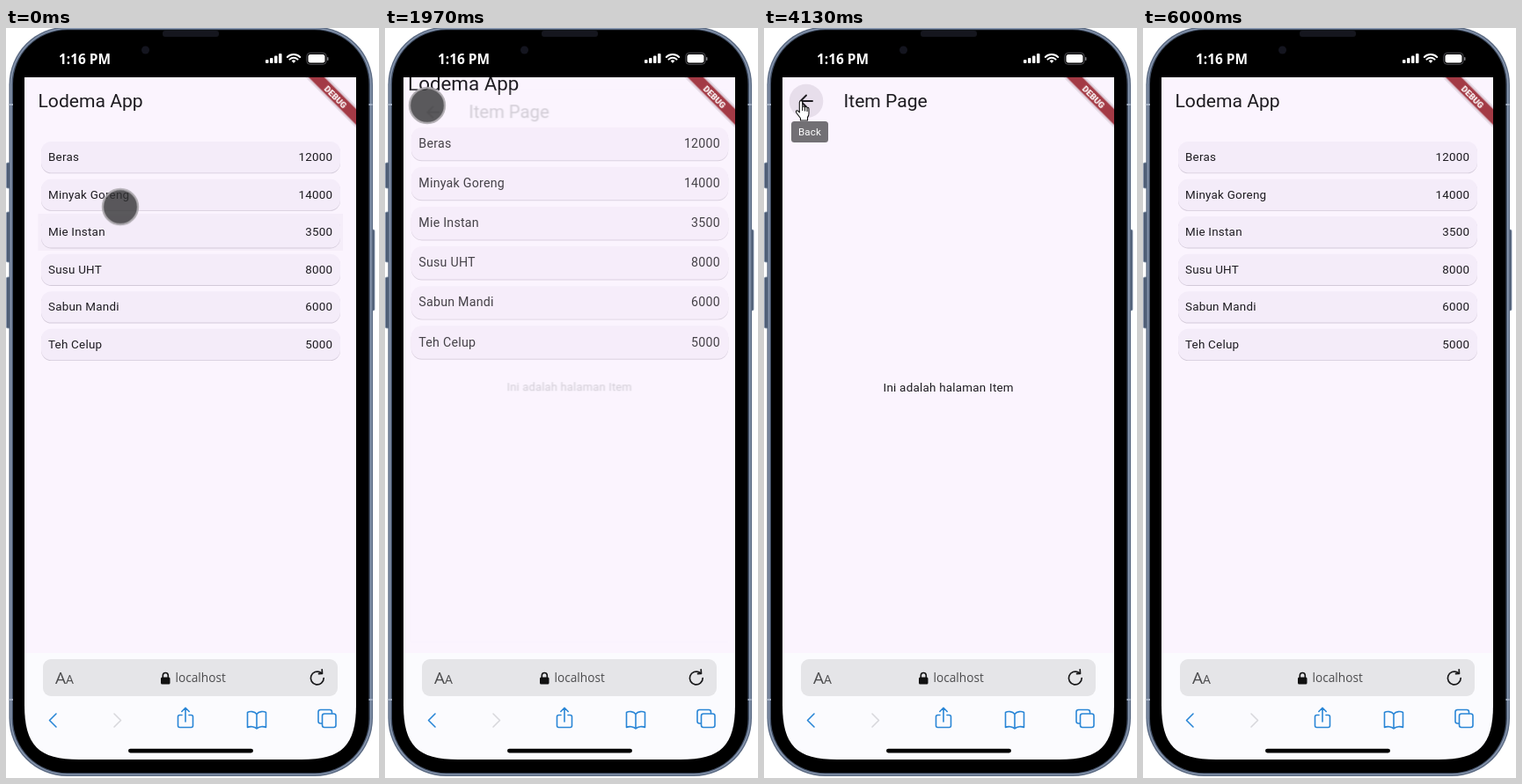
Animation of 424x852 px, one loop 6030 ms. Source, as an HTML page:

```html
<!DOCTYPE html>
<html lang="id">
<head>
<meta charset="utf-8">
<title>Lodema App</title>
<style>
html, body { margin: 0; width: 100%; height: 100%; overflow: hidden; background: #fff; }
svg { display: block; width: 424px; height: 852px; }
text { font-family: Roboto, "Open Sans", sans-serif; fill: #1d1b20; }
.title { font-size: 21.1px; }
.body { font-size: 13.4px; letter-spacing: .24px; }
.end { text-anchor: end; }
.mid { text-anchor: middle; }
.line { fill: none; stroke-linecap: round; stroke-linejoin: round; }
.page { fill: #fbf4fe; }

#home, #item, #touch, #hand, #tip, #halo, .glow {
  animation: 6030ms linear infinite;
}
#home, #item { transform-origin: 209.5px 400px; }
#home { animation-name: home; }
#item { animation-name: itemZoom, itemFade; }
#touch { animation-name: path, seen; }
#hand { animation-name: hand; }
#tip, #halo { animation-name: tip; }
.glow { opacity: 0; }
#glow0 { animation-name: glow0; }
#glow1 { animation-name: glow1; }
#glow2 { animation-name: glow2; }

/* Each zoom runs 300 ms: a quick first sixth, then a long settle. */
@keyframes home {
  0% { transform: scale(1); }
  7.463% { transform: scale(1); animation-timing-function: cubic-bezier(.3,0,.8,.15); }
  8.292% { transform: scale(1.02); animation-timing-function: cubic-bezier(.05,.7,.1,1); }
  12.438% { transform: scale(1.05); }
  31.858% { transform: scale(1.1); animation-timing-function: cubic-bezier(.3,0,.8,.15); }
  32.687% { transform: scale(1.06); animation-timing-function: cubic-bezier(.05,.7,.1,1); }
  36.833% { transform: scale(1); }
  53.566% { transform: scale(1); animation-timing-function: cubic-bezier(.3,0,.8,.15); }
  54.395% { transform: scale(1.02); animation-timing-function: cubic-bezier(.05,.7,.1,1); }
  58.541% { transform: scale(1.05); }
  70.149% { transform: scale(1.1); animation-timing-function: cubic-bezier(.3,0,.8,.15); }
  70.978% { transform: scale(1.06); animation-timing-function: cubic-bezier(.05,.7,.1,1); }
  75.124%, 100% { transform: scale(1); }
}
@keyframes itemZoom {
  0% { transform: scale(.85); }
  7.463% { transform: scale(.85); animation-timing-function: cubic-bezier(.3,0,.8,.15); }
  8.292% { transform: scale(.91); animation-timing-function: cubic-bezier(.05,.7,.1,1); }
  12.438% { transform: scale(1); }
  31.858% { transform: scale(1); animation-timing-function: cubic-bezier(.3,0,.8,.15); }
  32.687% { transform: scale(.96); animation-timing-function: cubic-bezier(.05,.7,.1,1); }
  36.833% { transform: scale(.9); }
  53.566% { transform: scale(.85); animation-timing-function: cubic-bezier(.3,0,.8,.15); }
  54.395% { transform: scale(.91); animation-timing-function: cubic-bezier(.05,.7,.1,1); }
  58.541% { transform: scale(1); }
  70.149% { transform: scale(1); animation-timing-function: cubic-bezier(.3,0,.8,.15); }
  70.978% { transform: scale(.96); animation-timing-function: cubic-bezier(.05,.7,.1,1); }
  75.124%, 100% { transform: scale(.9); }
}
@keyframes itemFade {
  0%, 8.085% { opacity: 0; }
  8.706%, 32.18% { opacity: 1; }
  32.8%, 54.187% { opacity: 0; }
  54.809%, 70.5% { opacity: 1; }
  71.12%, 100% { opacity: 0; }
}
@keyframes path {
  0% { transform: translate(130px,203.5px); animation-timing-function: ease-out; }
  3.98% { transform: translate(130px,154px); }
  14.43% { transform: translate(130px,154px); animation-timing-function: ease-in-out; }
  21.06% { transform: translate(58px,171px); }
  22.72% { transform: translate(58px,171px); animation-timing-function: ease-in-out; }
  26.2% { transform: translate(42px,92px); animation-timing-function: ease-out; }
  28.19% { transform: translate(48px,88px); }
  34.49% { transform: translate(48px,88px); animation-timing-function: ease-in-out; }
  40.96% { transform: translate(93px,190.5px); }
  54.73% { transform: translate(93px,190.5px); animation-timing-function: ease-in-out; }
  59.04% { transform: translate(43px,83px); }
  74.3% { transform: translate(44px,88px); animation-timing-function: cubic-bezier(.4,0,.8,.8); }
  82.92% { transform: translate(237px,353.3px); }
  86.24%, 100% { transform: translate(370px,527px); }
}
@keyframes seen {
  0% { opacity: 1; animation-timing-function: step-end; }
  59.2% { opacity: 0; animation-timing-function: step-end; }
  69.65% { opacity: 1; animation-timing-function: step-end; }
  86.73%, 100% { opacity: 0; }
}
@keyframes hand {
  0% { opacity: 0; animation-timing-function: step-end; }
  59.2% { opacity: 1; animation-timing-function: step-end; }
  69.65%, 100% { opacity: 0; }
}
@keyframes tip {
  0%, 62.8% { opacity: 0; }
  63.52%, 69.65% { opacity: 1; }
  71.1%, 100% { opacity: 0; }
}
@keyframes glow0 {
  0%, 3.5% { opacity: 0; }
  5%, 8% { opacity: 1; }
  9.5%, 100% { opacity: 0; }
}
@keyframes glow1 {
  0%, 39.8% { opacity: 0; }
  41.4%, 54.5% { opacity: 1; }
  56%, 100% { opacity: 0; }
}
@keyframes glow2 {
  0% { opacity: .4; }
  1.7%, 100% { opacity: 0; }
}
</style>
</head>
<body>
<svg viewBox="0 0 424 852">
  <defs>
    <clipPath id="view"><rect x="21" y="56" width="377" height="654"/></clipPath>
  </defs>

  <!-- phone body -->
  <g fill="#4d5c74" stroke="#8f9db3" stroke-width=".8">
    <rect x=".4" y="153" width="5" height="29" rx="1.5"/>
    <rect x=".4" y="209" width="5" height="57" rx="1.5"/>
    <rect x=".4" y="283" width="5" height="58" rx="1.5"/>
    <rect x="414" y="229" width="5" height="92" rx="1.5"/>
  </g>
  <rect x="3.500" y="-1.500" width="413.500" height="851.500" rx="66" fill="#5d6c84"/>
  <rect x="5" y="0" width="410.500" height="848.500" rx="64.500" fill="#8a99b1"/>
  <rect x="6.500" y="1.200" width="407.500" height="846" rx="63" fill="#46546b"/>
  <rect x="8" y="2.200" width="404.500" height="844" rx="61.500" fill="#000"/>
  <path d="M4 87h4M412.500 87h4M4 763h4M412.500 763h4" stroke="#a3b0c4" stroke-width="2"/>
  <rect x="178" y="3" width="64" height="7" rx="3" fill="#15161e"/>
  <circle cx="158.500" cy="25" r="4.500" fill="#14151f"/>

  <!-- status bar -->
  <text x="60" y="40.500" style="font:700 15.4px 'Open Sans',sans-serif;fill:#fff">1:16 PM</text>
  <g fill="#fff">
    <rect x="295" y="36" width="3.500" height="4" rx="1"/>
    <rect x="300" y="34" width="3.500" height="6" rx="1"/>
    <rect x="305" y="31.500" width="3.500" height="8.500" rx="1"/>
    <rect x="310" y="29" width="3.500" height="11" rx="1"/>
    <rect x="343.500" y="30" width="19" height="9.500" rx="2.500"/>
    <rect x="341.800" y="28.300" width="22.400" height="13" rx="4" fill="none" stroke="#66666c" stroke-width=".8"/>
    <rect x="365" y="33" width="1.500" height="4" rx=".7" fill="#808086"/>
    <path d="M324.700 37.300a3.600 3.600 0 0 1 4.600 0l-2.300 2.700z"/>
  </g>
  <path class="line" d="M319.800 33a10.300 10.300 0 0 1 14.400 0M322.400 35.600a6.600 6.600 0 0 1 9.200 0" stroke="#fff" stroke-width="2"/>

  <path d="M21 56H398V769C398 815 382 831 336 831H83C37 831 21 815 21 769z" fill="#fbfbfe"/>

  <!-- app -->
  <g clip-path="url(#view)">
    <rect class="page" x="21" y="56" width="377" height="654"/>
    <g id="home">
      <text class="title" x="36.500" y="89.500">Lodema App</text>
      <g id="list"></g>
    </g>
    <g id="item">
      <rect class="page" x="21" y="56" width="377" height="654"/>
      <circle id="halo" cx="48" cy="83" r="19.300" fill="#e7deeb"/>
      <path class="line" d="M55 83H42M48 76.500L41.500 83L48 89.500" stroke="#1d1b20" stroke-width="1.900"/>
      <text class="title" x="90.500" y="90">Item Page</text>
      <text class="body mid" x="209.700" y="412.800">Ini adalah halaman Item</text>
    </g>
    <g transform="translate(375 78) rotate(45)">
      <rect x="-60" y="-9" width="120" height="18" fill="#c9bccb" opacity=".45"/>
      <rect x="-60" y="-6.400" width="120" height="12.800" fill="#a33a45"/>
      <text class="mid" y="3.500" style="font-size:9.800px;font-weight:900;fill:#fff">DEBUG</text>
    </g>
  </g>

  <!-- browser bar -->
  <rect x="42" y="717" width="335" height="42" rx="9" fill="#e5e5e8"/>
  <text x="56" y="745" style="font:19px 'Open Sans',sans-serif;fill:#4c4c4e">A<tspan font-size="14">A</tspan></text>
  <rect x="176" y="737.500" width="10.500" height="8" rx="1.500" fill="#111"/>
  <path class="line" d="M178.300 738v-2.500a3 3 0 0 1 6 0V738" stroke="#111" stroke-width="1.600"/>
  <text x="192.500" y="743.300" style="font:13.700px 'Open Sans',sans-serif;fill:#4c4c4e">localhost</text>
  <path class="line" d="M361.200 738.500a7.400 7.400 0 1 1-3.700-6.400l1.500 1M355.500 733.700l4-.3-.3-4.600" stroke="#18181a" stroke-width="1.700"/>
  <g class="line" stroke="#2a86d6" stroke-width="1.600">
    <path d="M57 779L49.500 786.500L57 794"/>
    <path d="M123 779L130.500 786.500L123 794" stroke="#d8d8dc"/>
    <path d="M200 780.500h-2.500a2 2 0 0 0-2 2v10a2 2 0 0 0 2 2h13a2 2 0 0 0 2-2v-10a2 2 0 0 0-2-2H208M204 788V773M199.800 776.500L204 772.300L208.200 776.500"/>
    <path d="M285 779.500c-2.500-3.500-8-3.500-10.500-2v17c3-1.500 8-1.200 10.500 1.500c2.500-2.700 7.500-3 10.500-1.500v-17c-2.500-1.500-8-1.500-10.500 2V796"/>
    <rect x="359.500" y="779" width="15.500" height="15.500" rx="2.500"/>
    <path d="M359 790h-1.500a2.500 2.500 0 0 1-2.500-2.500v-10.500a2.500 2.500 0 0 1 2.500-2.500h10.500a2.500 2.500 0 0 1 2.500 2.500v1.500"/>
  </g>
  <rect x="139" y="818.700" width="142" height="4.800" rx="2.400" fill="#000"/>

  <!-- tooltip and pointers -->
  <g id="tip">
    <rect x="31" y="106" width="42" height="24" rx="3.500" fill="#727074"/>
    <text class="mid" x="52" y="122.200" style="font-size:11.500px;letter-spacing:.2px;fill:#fff">Back</text>
  </g>
  <g id="touch">
    <circle r="19.800" fill="#333234" fill-opacity=".8"/>
    <circle r="20" fill="none" stroke="#aaa6ab" stroke-width="2.400" opacity=".85"/>
  </g>
  <path id="hand" d="M40.300 94V84.500a1.700 1.700 0 0 1 3.400 0V89.500q1.600-1.200 2.800.3q1.500-1 2.500.6q1.800-.5 2 1.500V97q0 3-1.500 4.500V105H41.500V102.500L37 96.500q-1.200-2 .3-2.700q1.200-.4 3 2.200zM43.700 89.500V94M46.500 90V94.500M49 90.500V95" fill="#fff" stroke="#111" stroke-width="1.100" stroke-linejoin="round"/>
</svg>
<script>
const goods = [
  ['Beras', 12000], ['Minyak Goreng', 14000], ['Mie Instan', 3500],
  ['Susu UHT', 8000], ['Sabun Mandi', 6000], ['Teh Celup', 5000]
];
const row = ([name, price], i) => `
  <g transform="translate(0 ${146.8 + i * 42.55})">
    <rect id="glow${i}" class="glow" x="36.5" y="-21" width="346.5" height="42" fill="#ede3f2"/>
    <rect x="40" y="-16.5" width="340" height="35" rx="11.5" fill="#d3cad9"/>
    <rect x="40" y="-17.8" width="340" height="35.4" rx="11.5" fill="#f4ecf9"/>
    <text class="body" x="48" y="4.2">${name}</text>
    <text class="body end" x="371.3" y="4.2">${price}</text>
  </g>`;
document.getElementById('list').innerHTML = goods.map(row).join('');
</script>
</body>
</html>
```
